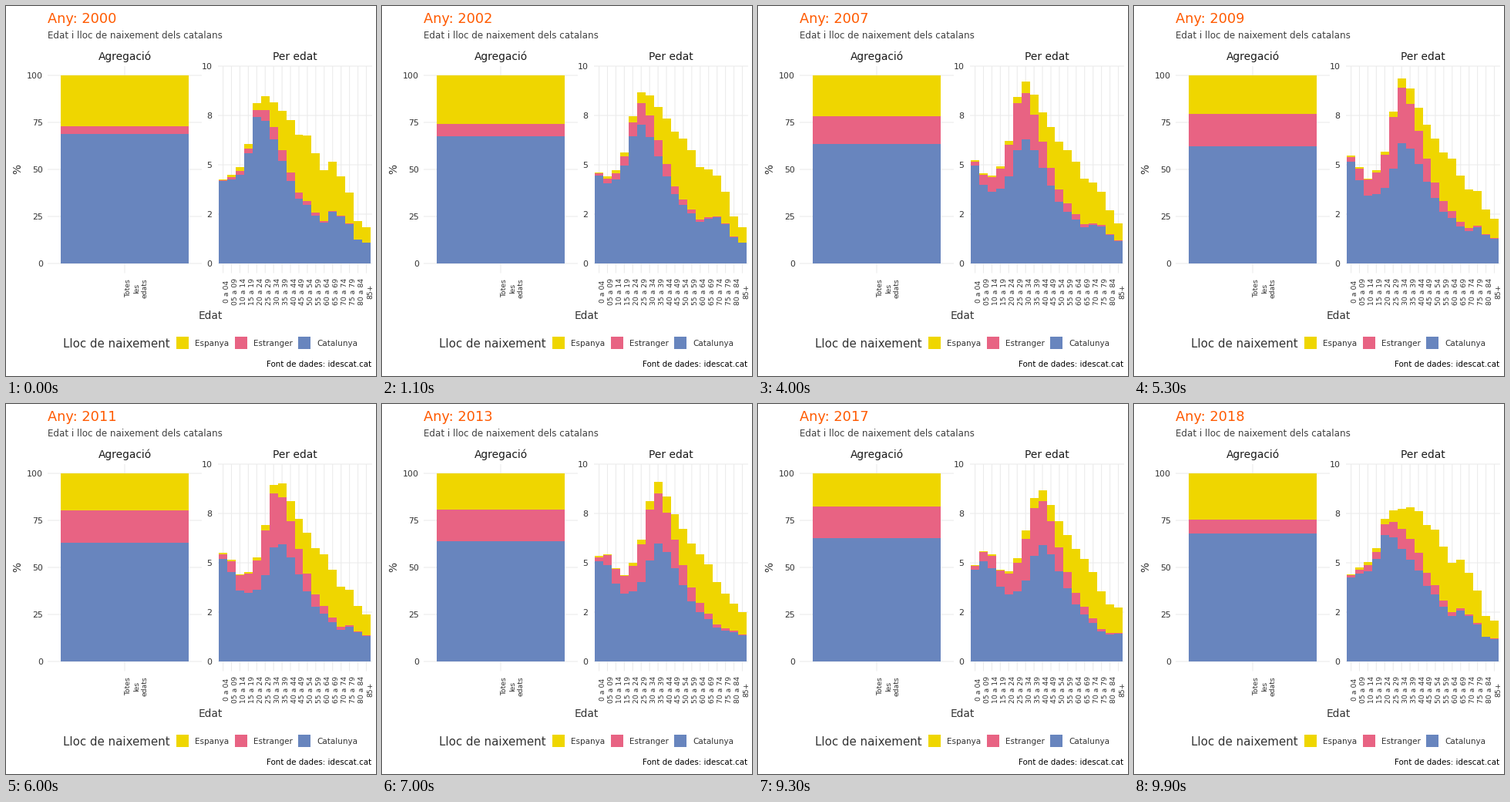
These frames come from a looping animation (480x480 px, 10 s). A matplotlib script:

```python
import numpy as np
import matplotlib.pyplot as plt
from matplotlib.animation import FuncAnimation
from matplotlib.patches import Rectangle

SIZE, DPI = 480, 100
FRAMES, INTERVAL = 100, 100

YELLOW, PINK, BLUE = "#EFD600", "#E86383", "#6885BE"
COLORS = (BLUE, PINK, YELLOW)
ORANGE, GRID = "#FF5A00", "#EBEBEB"
INK, DARK, GREY = "#1A1A1A", "#333333", "#404040"

# Panel geometry in pixels
TOP, BASE, BOTTOM = 78, 334, 346.5
LEFT_PANEL, RIGHT_PANEL = (54, 254), (275, 475)
BAR_X, BAR_W = 276.1, 10.936
TOTAL_X, TOTAL_W = 71, 166
FULL = 244           # height of 100 % on the left
TENTH = 256          # height of 10 % on the right

# Five-year age groups and birth cohorts, counted back from those born in 2000
AGES = np.arange(18)
COHORTS = np.arange(-4, 18)
BORN_HERE = [135, 156, 165, 136, 107, 109, 115, 143, 190, 185, 161,
             133, 107, 84, 76, 63, 54, 70, 67, 62, 45.5, 41.5]
BORN_SPAIN = [2, 2, 2, 2, 1, 3, 5, 6, 9, 18, 32,
              51, 68, 76, 86, 78, 68, 67, 57, 49, 34, 31]

# Immigration: size and age group of its peak over time
WAVE_YEAR = [2000, 2002, 2004.5, 2009, 2013, 2015, 2018]
WAVE_SIZE = [16.5, 29, 52, 74, 69, 64.5, 64]
WAVE_PEAK = [6.2, 5.6, 5.3, 5.8, 6.6, 7, 7.4]

# Share still living in each age group; the last group is open-ended
SURVIVAL = np.exp(-0.05 * np.exp(0.68 * (AGES - 13)))
SURVIVAL[-1] = 0.65

# (start, steps) of each yearly transition; the last one returns to 2000
MOVES = [(s, 4) for s in range(2, 33, 6)] + [(s, 3) for s in range(38, 99, 5)]


def immigrants(year):
    """Steep rise up to the peak age, slow decay after it."""
    size = np.interp(year, WAVE_YEAR, WAVE_SIZE)
    peak = np.interp(year, WAVE_YEAR, WAVE_PEAK)
    rise = np.interp(AGES / peak, [0, 0.18, 0.5, 0.7, 0.87, 1],
                     [0.08, 0.21, 0.36, 0.6, 0.93, 1])
    decay = np.exp(-0.2 * np.maximum(AGES - peak, 0) ** 1.3)
    return size * rise * decay


def profile(year):
    """Bar heights by origin and age; all of them add up to 100 %."""
    born = AGES - (year - 2000) / 5
    here = np.interp(born, COHORTS, BORN_HERE) * SURVIVAL
    spain = np.interp(born, COHORTS, BORN_SPAIN) * SURVIVAL
    spain += 0.5 * (year - 2000) * np.exp(-((AGES - 6.5) / 1.6) ** 2)
    abroad = immigrants(year)
    scale = (10 * TENTH - abroad.sum()) / (here.sum() + spain.sum())
    return np.array([here * scale, abroad, spain * scale])


PROFILES = [profile(year) for year in range(2000, 2019)]


def state(frame):
    """Return the year shown and the eased mix of two neighbouring years."""
    k, shift, label = 0, 0.0, 2000
    for i, (start, steps) in enumerate(MOVES):
        if frame >= start:
            p = min(1, (frame - start + 1) / steps)
            k, shift = i, (1 - np.cos(np.pi * p)) / 2
            label = 2000 + i + (frame - start >= 2)
    following = PROFILES[(k + 1) % len(PROFILES)]
    return label, (1 - shift) * PROFILES[k] + shift * following


fig = plt.figure(figsize=(SIZE / DPI, SIZE / DPI), dpi=DPI, facecolor="white")
ax = fig.add_axes([0, 0, 1, 1])
ax.set(xlim=(0, SIZE), ylim=(SIZE, 0))
ax.axis("off")


def text(x, y, s, px, color=DARK, ha="left", rotation=0):
    return ax.text(x, y, s, fontsize=px * 72 / DPI, color=color, ha=ha,
                   va="baseline", rotation=rotation, rotation_mode="anchor",
                   family="DejaVu Sans")


def line(xs, ys):
    ax.plot(xs, ys, color=GRID, lw=1.07 * 72 / DPI, zorder=0, snap=False,
            solid_capstyle="butt")


def box(x, y, w, h, color):
    return ax.add_patch(Rectangle((x, y), w, h, fc=color, lw=0,
                                  antialiased=False, zorder=2))


# Headings
title = text(54, 22, "", 17.8, ORANGE)
text(54, 42, "Edat i lloc de naixement dels catalans", 11.95, GREY)
text(154, 70, "Agregació", 13.8, INK, "center")
text(375, 70, "Per edat", 13.7, INK, "center")

# Grid and axes
for i, (total, share) in enumerate(zip((0, 25, 50, 75, 100), (0, 2, 5, 8, 10))):
    y_total, y_share = BASE - i * FULL / 4, BASE - i * TENTH / 4
    line(LEFT_PANEL, (y_total, y_total))
    line(RIGHT_PANEL, (y_share, y_share))
    text(48, y_total + 4, str(total), 11, DARK, "right")
    text(267.5, y_share + 4, str(share), 11, DARK, "right")
line((154, 154), (TOP, BOTTOM))
for i, word in enumerate(("Totes", "les", "edats")):
    text(161.5 + 10.3 * i, 366, word, 9.3, DARK, "center", 90)
for i in AGES:
    x = BAR_X + (i + 0.5) * BAR_W
    line((x, x), (TOP, BOTTOM))
    low = 5 * i
    name = "85+" if i == 17 else f"{low:02d} a {low + 4:02d}" if i else "0 a 04"
    text(x + 7.5, 370.5, name, 9.3, DARK, "center", 90)
text(19.5, 212, "%", 13.6, DARK, "center", 90)
text(265, 406, "Edat", 13.7, DARK, "center")

# Legend and caption
text(74, 443, "Lloc de naixement", 15, DARK)
for x, name, color in ((221, "Espanya", YELLOW), (297, "Estranger", PINK),
                       (379, "Catalunya", BLUE)):
    box(x, 429, 16, 16, color)
    text(x + 24, 441, name, 10.4, DARK)
text(474, 468, "Font de dades: idescat.cat", 10.3, "black", "right")

total_bars = [box(TOTAL_X, BASE, TOTAL_W, 0, c) for c in COLORS]
age_bars = [[box(BAR_X + i * BAR_W, BASE, BAR_W, 0, c) for i in AGES]
            for c in COLORS]


def stack(bar, floor, height):
    bar.set_y(BASE - floor - height)
    bar.set_height(height)


def draw(frame):
    label, shares = state(frame)
    title.set_text(f"Any: {label}")
    floors, total_floor = np.zeros(len(AGES)), 0
    for total_bar, bars, heights in zip(total_bars, age_bars, shares):
        part = FULL * heights.sum() / shares.sum()
        stack(total_bar, total_floor, part)
        total_floor += part
        for bar, floor, height in zip(bars, floors, heights):
            stack(bar, floor, height)
        floors = floors + heights
    return [title]


anim = FuncAnimation(fig, draw, frames=FRAMES, interval=INTERVAL,
                     repeat=True, repeat_delay=0, blit=False)
plt.show()
```
